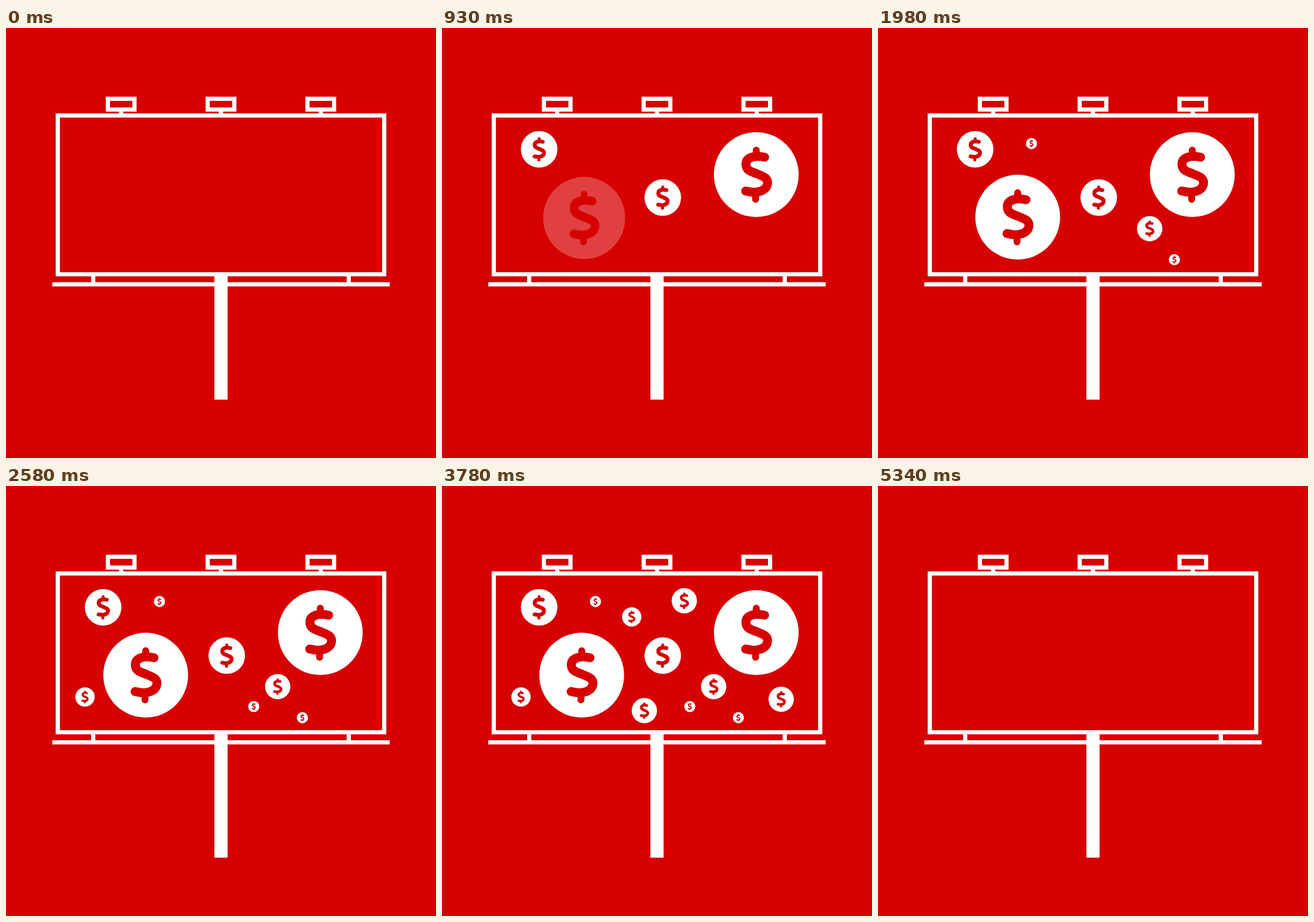
An HTML page with a canvas for the animation above (6300 ms loop, 748 by 748 pixels).

```html
<!DOCTYPE html>
<html lang="en">
<head>
<meta charset="utf-8">
<title>Billboard</title>
<style>
  html, body { margin: 0; width: 100%; height: 100%; overflow: hidden; background: #d60000; }
  canvas { display: block; width: 100%; height: 100%; }
</style>
</head>
<body>
<canvas width="748" height="748"></canvas>
<script>
const RED = '#d60000', WHITE = '#fff';
const MID = 374, LINE = 7.3;
const LOOP = 6300, STEP = 30, GAP = 300, RISE = 90, EXIT = 5130, EXIT_LEN = 210;
const ctx = document.querySelector('canvas').getContext('2d');

// coin centres in order of appearance, with radius
const HUGE = 73.75, BIG = 31.8, MEDIUM = 22, SMALL = 16.8, TINY = 9.7;
const coins = [
  [546.7, 255, HUGE], [169, 211, BIG], [384, 295, BIG], [243, 329, HUGE],
  [267, 201, TINY], [472.6, 349, MEDIUM], [515.6, 403, TINY], [431, 383.6, TINY],
  [137.4, 367, SMALL], [330, 227.7, SMALL], [590, 371, MEDIUM], [421.5, 199.6, MEDIUM],
  [352, 390.7, MEDIUM]
];

// dollar sign for a coin of radius HUGE
const letter = new Path2D('M14.5-30.3C-3-34.3-18-30-18-18C-18-6-7-5 2-1S19.6 5 19.6 14C19.6 28 2 34-18.5 28.6');
const bars = new Path2D('M0-42.5V-31M-1.2 31V43');

const ease = p => (1 - Math.cos(Math.PI * Math.min(1, Math.max(0, p)))) / 2;

function stroke(path, color, width) {
  ctx.strokeStyle = color;
  ctx.lineWidth = width;
  ctx.stroke(path);
}

function drawCoin([x, y, r], age, fade) {
  const rise = ease(age / RISE);
  // grow past full size about the stage centre, then settle
  const grow = 0.95 + 0.07 * rise - 0.02 * ease(age / RISE - 1);
  const size = grow * r / HUGE;
  ctx.save();
  ctx.translate(MID + (x - MID) * grow, MID + (y - MID) * grow);
  ctx.scale(size, size);
  ctx.globalAlpha = rise * fade;
  ctx.fillStyle = WHITE;
  ctx.beginPath();
  ctx.arc(0, 0, HUGE, 0, 7);
  ctx.fill();
  ctx.globalAlpha = 1;
  ctx.lineCap = 'round';
  stroke(letter, RED, 15.5);
  stroke(bars, RED, 12);
  ctx.restore();
}

function drawBoard() {
  const frame = new Path2D();
  frame.rect(MID - 283.9, 152.1, 567.8, 276.2);
  frame.rect(MID - 293.5, 445.9, 587, 0);
  for (const side of [-1, 0, 1]) {
    const lamp = MID + side * 173.6, post = MID + side * 222.3;
    frame.rect(lamp - 23.1, 123.2, 46.2, 18.6);
    frame.moveTo(lamp, 144.5);
    frame.lineTo(lamp, 150);
    frame.moveTo(post, 430);
    frame.lineTo(post, 444);
  }
  ctx.lineCap = 'butt';
  stroke(frame, WHITE, LINE);
  ctx.fillStyle = WHITE;
  ctx.fillRect(MID - 11.5, 428, 23, 218.5);
}

// the flat bar must not gain square ends from its line joins
ctx.lineJoin = 'miter';

function draw(t) {
  ctx.fillStyle = RED;
  ctx.fillRect(0, 0, 2 * MID, 2 * MID);
  const fade = 1 - ease((t - EXIT) / EXIT_LEN);
  coins.forEach((coin, i) => {
    if (t > i * GAP && fade > 0) drawCoin(coin, t - i * GAP, fade);
  });
  drawBoard();
}

const start = performance.now();
function tick() {
  const t = (performance.now() - start) % LOOP;
  draw(Math.floor(t / STEP) * STEP);
  requestAnimationFrame(tick);
}
tick();
</script>
</body>
</html>
```
